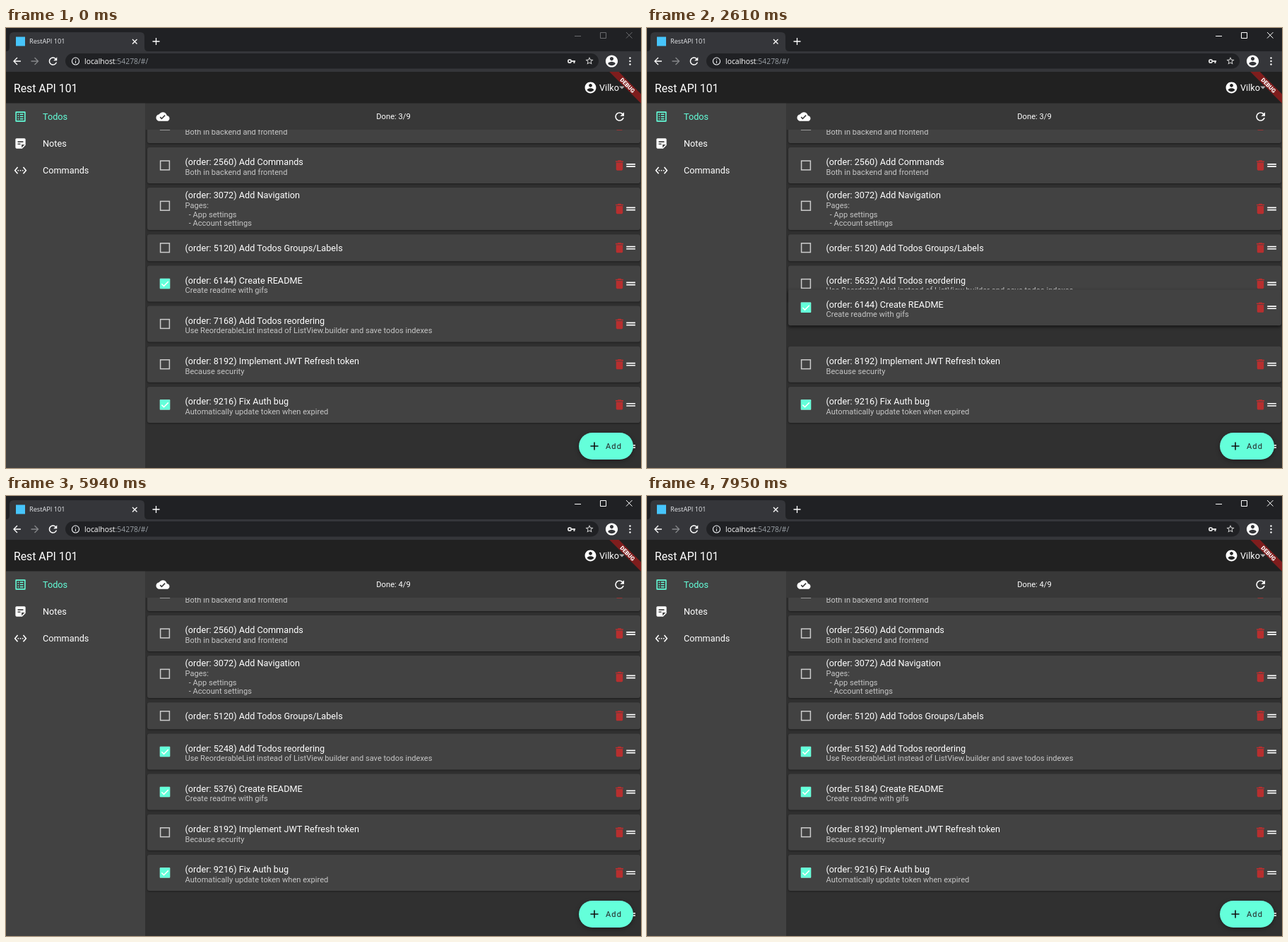
Write an HTML page that moves like this. It is 899 px wide and 623 px high and loops after 7.99 s.

```html
<!DOCTYPE html>
<html lang="en">
<head>
<meta charset="utf-8">
<title>Rest API 101</title>
<style>
html, body { margin: 0; width: 100%; height: 100%; overflow: hidden; background: #303030; }
svg { display: block; width: 899px; height: 623px; font-family: Roboto, sans-serif; fill: #fff; }
text { white-space: pre; }
.chrome { font-family: "Open Sans", sans-serif; }
.title, .nav { font-size: 12.7px; }
.sub { font-size: 11.1px; fill: #c6c6c6; }
.card { fill: #424242; filter: drop-shadow(0 1px 1px rgba(0,0,0,.4)); }
.lifted .card { filter: drop-shadow(0 2px 2px rgba(0,0,0,.65)); }
.line { fill: none; stroke: #fff; }
</style>
</head>
<body>
<svg id="stage" viewBox="0 0 899 623"></svg>
<script>
const icons = {
  cloud: 'M19.35 10.04C18.67 6.59 15.64 4 12 4 9.11 4 6.6 5.64 5.35 8.04 2.34 8.36 0 10.91 0 14c0 3.31 2.69 6 6 6h13c2.76 0 5-2.24 5-5 0-2.64-2.05-4.78-4.65-4.96zM10 17l-3.5-3.5 1.41-1.41L10 14.17 15.18 9l1.41 1.41L10 17z',
  sync: 'M12 4V1L8 5l4 4V6c3.31 0 6 2.69 6 6 0 1.01-.25 1.97-.7 2.8l1.46 1.46C19.54 15.03 20 13.57 20 12c0-4.42-3.58-8-8-8zm0 14c-3.31 0-6-2.69-6-6 0-1.01.25-1.97.7-2.8L5.24 7.74C4.46 8.97 4 10.43 4 12c0 4.42 3.58 8 8 8v3l4-4-4-4v3z',
  refresh: 'M17.65 6.35C16.2 4.9 14.21 4 12 4c-4.42 0-7.99 3.58-7.99 8s3.57 8 7.99 8c3.73 0 6.84-2.55 7.73-6h-2.08c-.82 2.33-3.04 4-5.65 4-3.31 0-6-2.69-6-6s2.69-6 6-6c1.66 0 3.14.69 4.22 1.78L13 11h7V4l-2.35 2.35z',
  account: 'M12 2C6.48 2 2 6.48 2 12s4.48 10 10 10 10-4.48 10-10S17.52 2 12 2zm0 3c1.66 0 3 1.34 3 3s-1.34 3-3 3-3-1.34-3-3 1.34-3 3-3zm0 14.2c-2.5 0-4.71-1.28-6-3.22.03-1.99 4-3.08 6-3.08 1.99 0 5.97 1.09 6 3.08-1.29 1.94-3.5 3.22-6 3.22z',
  trash: 'M6 19c0 1.1.9 2 2 2h8c1.1 0 2-.9 2-2V7H6v12zM19 4h-3.5l-1-1h-5l-1 1H5v2h14V4z',
  handle: 'M20 9H4v2h16V9zM4 15h16v-2H4v2z',
  note: 'M19 3H4.99C3.89 3 3 3.9 3 5l.01 14c0 1.1.89 2 1.99 2h10l6-6V5c0-1.1-.9-2-2-2zM7 8h10v2H7V8zm5 6H7v-2h5v2zm2 5.5V14h5.5L14 19.5z',
  code: 'M7.77 6.76L6.23 5.48.82 12l5.41 6.52 1.54-1.28L3.42 12l4.35-5.24zM7 13h2v-2H7v2zm10-2h-2v2h2v-2zm-6 2h2v-2h-2v2zm6.77-7.52l-1.54 1.28L20.58 12l-4.35 5.24 1.54 1.28L23.18 12l-5.41-6.52z',
  list: 'M19 5v14H5V5h14m1.1-2H3.9c-.5 0-.9.4-.9.9v16.2c0 .4.4.9.9.9h16.2c.4 0 .9-.5.9-.9V3.9c0-.5-.5-.9-.9-.9zM11 7h6v2h-6V7zm0 4h6v2h-6v-2zm0 4h6v2h-6v-2zM7 7h2v2H7V7zm0 4h2v2H7v-2zm0 4h2v2H7v-2z',
  back: 'M20 11H7.83l5.59-5.59L12 4l-8 8 8 8 1.41-1.41L7.83 13H20v-2z',
  forward: 'M12 4l-1.41 1.41L16.17 11H4v2h12.17l-5.58 5.59L12 20l8-8z',
  info: 'M11 7h2v2h-2zm0 4h2v6h-2zm1-9C6.48 2 2 6.48 2 12s4.48 10 10 10 10-4.48 10-10S17.52 2 12 2zm0 18c-4.41 0-8-3.59-8-8s3.59-8 8-8 8 3.59 8 8-3.59 8-8 8z',
  star: 'M22 9.24l-7.19-.62L12 2 9.19 8.63 2 9.24l5.46 4.73L5.82 21 12 17.27 18.18 21l-1.63-7.03L22 9.24zM12 15.4l-3.76 2.27 1-4.28-3.32-2.88 4.38-.38L12 6.1l1.71 4.04 4.38.38-3.32 2.88 1 4.28L12 15.4z',
  add: 'M19 13h-6v6h-2v-6H5v-2h6V5h2v6h6v2z'
};
const mint = '#64ffda';
const icon = (name, x, y, fill = '#fff', scale = .793, id = '') =>
  `<path id="${id}" d="${icons[name]}" fill="${fill}" transform="translate(${x} ${y}) scale(${scale}) translate(-12 -12)"/>`;
const rect = (x, y, w, h, fill, rx = 0) =>
  `<rect x="${x}" y="${y}" width="${w}" height="${h}" rx="${rx}" fill="${fill}"/>`;
const text = (x, y, s, cls, attrs = '') => `<text x="${x}" y="${y}" class="${cls}" ${attrs}>${s}</text>`;

// A card is drawn around its own vertical centre.
function card(id, y, height, title, lines = [], checked = false, tall = false) {
  const boxY = tall ? -4.2 : 0;
  const titleY = tall ? -14.7 : lines.length ? -.2 : 4.6;
  return `<g id="${id}" transform="translate(0 ${y})">
    <rect class="card" x="200" y="${-height / 2}" width="698" height="${height}" rx="3"/>
    <rect class="line box" x="218.6" y="${boxY - 6.4}" width="12.8" height="12.8" stroke-width="1.5" style="stroke:#ccc"/>
    <g class="tick" visibility="${checked ? 'inherit' : 'hidden'}">
      ${rect(217.8, -7.2, 14.4, 14.4, mint, 1)}
      <path class="line" d="M220.3 .2l3.2 3.2 6.3-6.4" stroke-width="1.5"/>
    </g>
    ${text(253.5, titleY, title, 'title')}
    ${lines.map((s, i) => text(i ? 258.7 : 253.5, titleY + 13.6 + i * 12.7, s, 'sub')).join('')}
    ${icon('trash', 868.5, 0, '#b72f2f')}${icon('handle', 884.6, 0)}
  </g>`;
}

const slotA = 362, slotB = 419;
const stage = document.getElementById('stage');
stage.innerHTML = `
  <defs><clipPath id="view"><rect x="197" y="144" width="702" height="479"/></clipPath></defs>
  ${rect(0, 0, 899, 623, '#303030')}
  <g clip-path="url(#view)"><g id="cards">
    ${card('first', 137.5, 51, '(order: 2048) Add Notes', ['Both in backend and frontend'])}
    ${card('commands', 194.5, 51, '(order: 2560) Add Commands', ['Both in backend and frontend'])}
    ${card('navigation', 256, 60, '(order: 3072) Add Navigation', ['Pages:', '- App settings', '- Account settings'], false, true)}
    ${card('groups', 311.2, 38, '(order: 5120) Add Todos Groups/Labels')}
    ${card('token', 476.2, 51, '(order: 8192) Implement JWT Refresh token', ['Because security'])}
    ${card('bug', 533.4, 51, '(order: 9216) Fix Auth bug', ['Automatically update token when expired'], true)}
    ${card('readme', slotA, 51, '', ['Create readme with gifs'], true)}
    ${card('reorder', slotB, 51, '', ['Use ReorderableList instead of ListView.builder and save todos indexes'])}
  </g>
  <circle id="hover" cx="868.5" cy="361.5" r="17" fill-opacity=".07"/></g>

  ${rect(197, 106, 702, 38, '#383838')}
  ${icon('cloud', 222, 125.5, '#fff', .793, 'cloud')}${icon('sync', 222, 125.5, '#fff', .793, 'sync')}
  ${text(548.5, 129.4, '', 'done', 'id="done" font-size="11.2" text-anchor="middle"')}
  ${icon('refresh', 868.7, 125.5)}

  ${rect(0, 106, 197, 517, '#424242')}
  ${icon('list', 20.5, 125.5, mint)}${icon('note', 20.5, 163.5)}${icon('code', 20.5, 201.7)}
  ${text(52, 130, 'Todos', 'nav', `fill="${mint}"`)}
  ${text(52, 168, 'Notes', 'nav')}${text(52, 206.2, 'Commands', 'nav')}

  ${rect(0, 62, 899, 44.5, '#212121')}
  ${text(11, 90.6, 'Rest API 101', '', 'font-size="15.8"')}
  ${icon('account', 827.5, 84.5)}
  ${text(840, 88.9, 'Vilko', 'nav')}
  <path d="M868 82.5h8l-4 4z" fill="#aaa"/>
  <g transform="translate(899 62) rotate(45)">
    ${rect(-33, 22.2, 66, 9.5, '#7f1d1d')}
    ${text(0, 29.9, 'DEBUG', '', 'font-size="8.1" font-weight="900" text-anchor="middle"')}
  </g>

  ${rect(0, 0, 899, 33, '#202124')}
  <path d="M0 33q5 0 5-6V12q0-6 6-6h179q6 0 6 6v15q0 6 5 6z" fill="#35363a"/>
  ${rect(0, 33, 899, 29, '#35363a')}
  ${rect(84, 36, 755, 21.5, '#202124', 10.75)}
  ${rect(14, 12.5, 13, 13, '#47c5fb')}
  ${text(33, 22.3, 'RestAPI 101', 'chrome', 'font-size="9.2" fill="#e8eaed"')}
  <path class="line" d="M179 16l6.5 6.5m0-6.5l-6.5 6.5M207.5 19h10m-5-5v10" stroke-width="1.3"/>
  <g id="controls" class="line"><path d="M805 11.5h9M841.5 6.5h8v8h-8zM878 6l8.5 8.5m0-8.5l-8.5 8.5"/></g>
  ${icon('back', 15.5, 47, '#fff', .68)}${icon('forward', 41, 47, '#85878a', .68)}${icon('refresh', 66.5, 47, '#fff', .72)}
  ${icon('info', 98.5, 47, '#e8eaed', .56)}
  ${text(111, 50.8, 'localhost<tspan fill="#9aa0a6">:54278/#/</tspan>', 'chrome', 'font-size="10.4"')}
  <g class="line" style="stroke:#ddd"><circle cx="798" cy="47" r="2.2" stroke-width="1.8"/><path d="M800 47h6m-1.6 0v3" stroke-width="1.9"/></g>
  ${icon('star', 826, 46.5, '#ddd', .56)}${icon('account', 857.5, 47, '#fff', .86)}
  ${[42.5, 47, 51.5].map(y => `<circle cx="883.5" cy="${y}" r="1.2"/>`).join('')}

  ${icon('handle', 884.6, 592.5)}
  <g style="filter:drop-shadow(0 2px 3px rgba(0,0,0,.35))">${rect(811, 573, 77, 38, mint, 19)}</g>
  ${icon('add', 833, 592, '#111')}
  ${text(849, 596.2, 'Add', '', 'font-size="11.1" letter-spacing="1.1" fill="#222"')}
`;

const get = id => document.getElementById(id);
const cards = get('cards');
const todos = {
  readme: { name: 'Create README', orders: [[0, 6144], [3170, 5376], [6900, 5184]] },
  reorder: { name: 'Add Todos reordering', orders: [[0, 7168], [1880, 5632], [4750, 5248], [7950, 5152]] }
};
// start, dragged card, time the card is put down
const drags = [[1160, 'reorder', 1610], [2440, 'readme', 2860], [3860, 'reorder', 4450],
  [5970, 'readme', 6450], [7260, 'reorder', 7680]];
const syncs = [[1610, 1880], [2860, 3170], [4450, 4750], [5080, 5510], [6450, 6900], [7680, 7950]];

const clamp = u => Math.max(0, Math.min(1, u));
const ease = u => (u = clamp(u), u * u * (3 - 2 * u));
const latest = (list, t) => list.filter(e => e[0] <= t).pop() || list[0];
const show = (el, on) => el.setAttribute('visibility', on ? 'inherit' : 'hidden');

function draw(t) {
  const [start, dragged, end] = latest(drags, t);
  const other = dragged === 'readme' ? 'reorder' : 'readme';
  const place = {
    [dragged]: slotB + (slotA - slotB) * ease((t - start) / 390),
    [other]: slotA + (slotB - slotA) * ease((t - start - 170) / 220)
  };
  for (const id in todos) {
    const el = get(id), { name, orders } = todos[id];
    el.setAttribute('transform', `translate(0 ${place[id]})`);
    el.classList.toggle('lifted', id === dragged && t >= start && t < end);
    el.querySelector('.title').textContent = `(order: ${latest(orders, t)[1]}) ${name}`;
  }
  if (cards.lastElementChild.id !== dragged) cards.append(get(dragged));

  const ticked = t >= 5080;
  show(get('reorder').querySelector('.tick'), ticked);
  get('done').textContent = `Done: ${ticked ? 4 : 3}/9`;

  const busy = syncs.some(([a, b]) => t >= a && t < b);
  show(get('sync'), busy);
  show(get('cloud'), !busy);
  get('hover').setAttribute('opacity', Math.min(clamp((t - 1560) / 80), clamp((1880 - t) / 150)));
  get('controls').style.stroke = t < 1160 ? '#6b6c6f' : '#fff';
}

const begin = performance.now();
function tick() {
  draw((performance.now() - begin) % 7990);
  requestAnimationFrame(tick);
}
tick();
</script>
</body>
</html>
```
